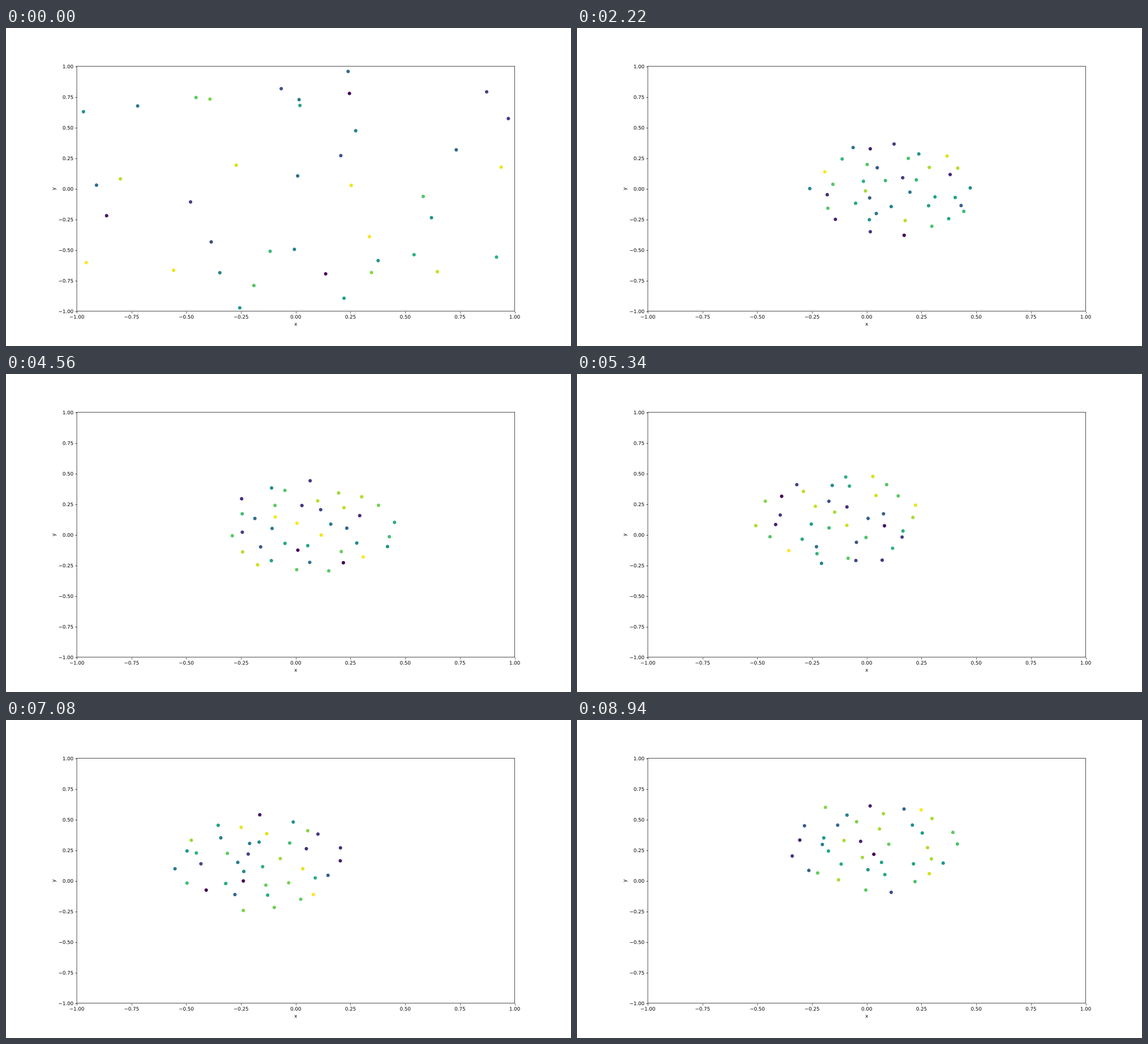
A matplotlib script that plays this animation: 998 by 561 pixels, repeating every 9000 ms.

```python
import numpy as np
import matplotlib.pyplot as plt
from matplotlib.animation import FuncAnimation
from matplotlib.patheffects import Normal

W, H, DPI = 998, 561, 62.375
FRAMES, INTERVAL = 150, 60
SUB = 6                        # physics steps per frame
DT = INTERVAL / 1000 / SUB
COUNT = 40
PULL, RADIUS = 3.5, 0.41       # swarm stiffness (1/s) and resting radius


def centre_path(t):
    """Slow sway with a quicker wobble, rising steadily."""
    x = -.03 + .14 * np.cos(.87 * (t - 3.3)) + .07 * np.cos(2 * np.pi * (t - 6.1) / 1.3)
    y = -.07 + .035 * t + .035 * np.cos(2 * np.pi * (t - 3.1) / 2.9)
    return np.stack([x, y], axis=-1)


def unit(angle):
    return np.stack([np.cos(angle), np.sin(angle)], axis=-1)


def push_apart(p):
    d = p[:, None] - p[None]
    r2 = (d ** 2).sum(-1, keepdims=True) + 5e-4
    return (PULL * RADIUS) ** 2 / len(p) * (d / r2).sum(1)


def simulate():
    rng = np.random.default_rng(7)
    t = np.arange(FRAMES * SUB) * DT
    centre = centre_path(t)
    drift = np.gradient(centre, DT, axis=0)

    # positions and velocities are kept relative to the moving centre
    start = rng.uniform(-.98, .98, (COUNT, 2))
    inward = np.arctan2(-start[:, 1], -start[:, 0]) + rng.uniform(-.8, .8, COUNT)
    speed = rng.uniform(.1, .9, COUNT)
    pos = start - centre[0]
    vel = speed[:, None] * unit(inward) - drift[0]
    rate = rng.uniform(2.5, 5, COUNT)
    phase = rng.uniform(0, 2 * np.pi, COUNT)

    places, speeds = [], []
    for k, now in enumerate(t):
        if k % SUB == 0:
            places.append(pos + centre[k])
            speeds.append(np.linalg.norm(vel + drift[k], axis=1))
        wander = .9 * unit(rate * now + phase)
        acc = push_apart(pos) - PULL ** 2 * pos - 2 * PULL * vel + wander
        vel = vel + acc * DT
        pos = pos + vel * DT
    return places, speeds


places, speeds = simulate()

fig, ax = plt.subplots(figsize=(W / DPI, H / DPI), dpi=DPI)
nudge = .3                     # keeps the frame lines between whole pixels
fig.subplots_adjust(left=.125 + nudge / W, right=.9 + nudge / W,
                    bottom=.11 - nudge / H, top=.88 - nudge / H)
ax.set(xlim=(-1, 1), ylim=(-1, 1), xlabel="x", ylabel="y")
for spine in ax.spines.values():
    spine.set_snap(False)
for text in [ax.xaxis.label, ax.yaxis.label, *ax.get_xticklabels(), *ax.get_yticklabels()]:
    text.set_path_effects([Normal()])
dots = ax.scatter(*places[0].T, c=speeds[0], cmap="viridis")


def update(i):
    dots.set_offsets(places[i])
    dots.set_array(speeds[i])
    dots.set_clim(speeds[i].min(), speeds[i].max())
    return dots,


anim = FuncAnimation(fig, update, frames=FRAMES, interval=INTERVAL, repeat=True, repeat_delay=0)
plt.show()
```
